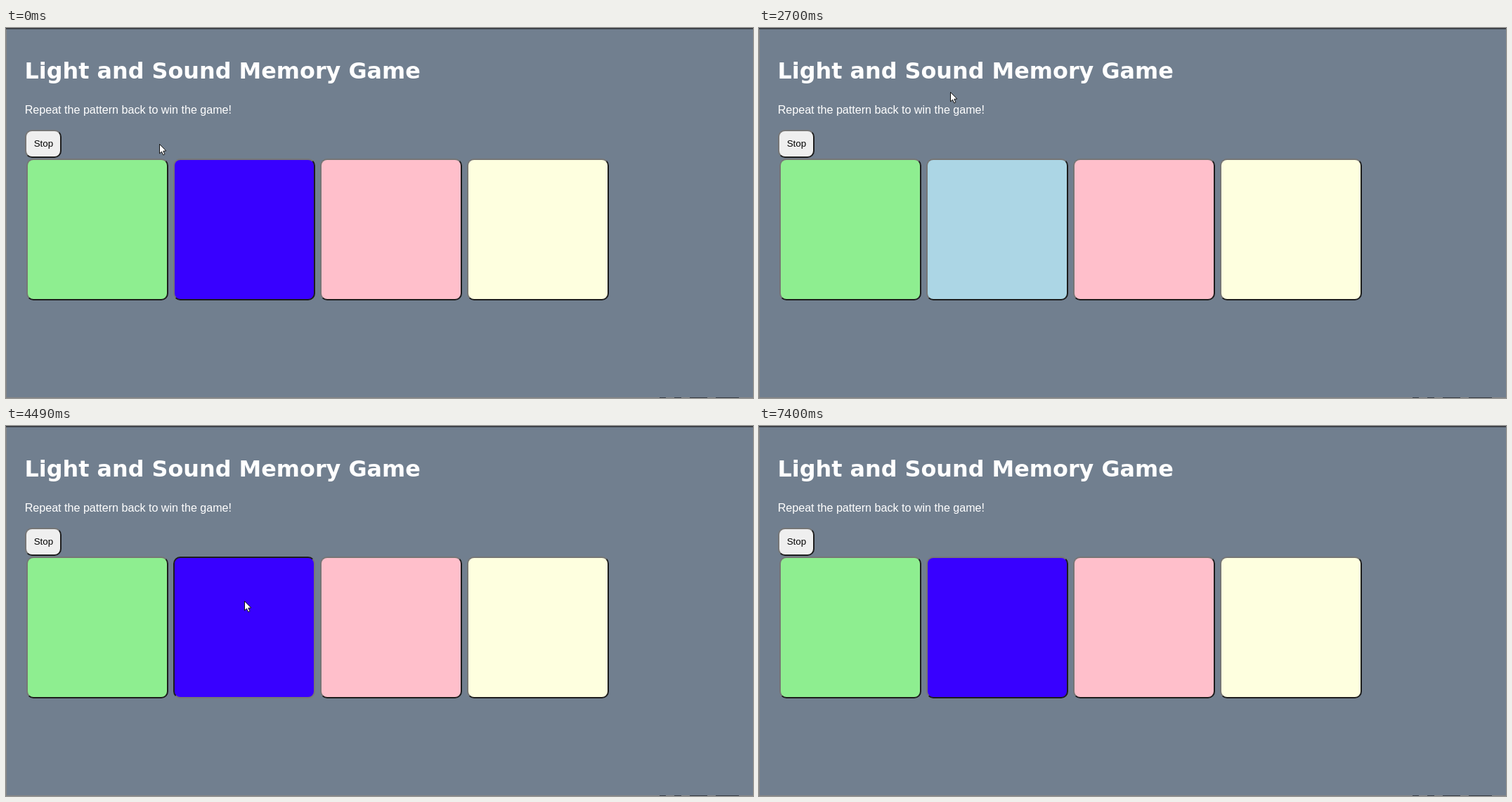
An HTML page with a canvas for the animation above (8 s loop, 1063 px wide and 527 px high).

```html
<!DOCTYPE html>
<html lang="en">
<head>
<meta charset="utf-8">
<title>Memory game</title>
<style>
html, body { margin: 0; width: 100%; height: 100%; overflow: hidden; background: #717f8f; }
canvas { display: block; }
</style>
</head>
<body>
<canvas id="stage" width="1063" height="527"></canvas>
<script>
const ctx = document.getElementById('stage').getContext('2d');
const LOOP = 8000;
const LIGHT = '#767676', DARK = '#1d1d1d';

// Clues glow for HOLD, one per PERIOD, in rounds of two
const HOLD = 1010, PERIOD = 1320, ROUNDS = [-2060, 1680, 6080];

// Two clicks in a row
const CLICK = 4490, CLICK_GAP = 420, CLICK_HOLD = 140;

// The pointer glides in steps of one BEAT, then vanishes over the text
const BEAT = 140, HIDE = 5450;
const HOME = { x: 218, y: 165 };
const GLIDES = [
  { at: 390, steps: 2, x: 335, y: 238 },
  { at: 850, steps: 1, x: 272, y: 91 },
  { at: 2820, steps: 3, x: 340, y: 238 },
  { at: 4340, steps: 2, x: 339, y: 249 },
  { at: 5190, steps: 3, x: 290, y: 94 }
];

// True in the first `hold` ms of each of two repeats
const pulse = (t, period, hold) => t >= 0 && t < 2 * period && t % period < hold;
const isPressed = t => pulse(t - CLICK, CLICK_GAP, CLICK_HOLD);
const isLit = t => isPressed(t) || ROUNDS.some(start => pulse(t - start, PERIOD, HOLD));

function pointerAt(t) {
  let { x, y } = HOME;
  for (const g of GLIDES) {
    if (t < g.at) break;
    const p = Math.min(1, Math.floor((t - g.at) / BEAT + 1) / g.steps);
    x += (g.x - x) * p;
    y += (g.y - y) * p;
  }
  return [Math.round(x), Math.round(y)];
}

function rect(color, x, y, w, h) {
  ctx.fillStyle = color;
  ctx.fillRect(x, y, w, h);
}

function round(color, x, y, w, h, r) {
  ctx.fillStyle = color;
  ctx.beginPath();
  ctx.roundRect(x, y, w, h, r);
  ctx.fill();
}

function polygon(points) {
  ctx.beginPath();
  points.forEach(([x, y]) => ctx.lineTo(x, y));
  ctx.closePath();
}

function text(str, font, color, x, y) {
  ctx.font = font;
  ctx.fillStyle = color;
  ctx.fillText(str, x, y);
}

// Bevelled button: the two border tones meet on the corner diagonals
function button(x, y, w, h, fill, pressed = false) {
  const r = 10, b = 2;
  const half = (color, cx, cy) => {
    ctx.save();
    polygon([[x, y + h], [cx, cy], [x + w, y], [x + w - r, y + r], [x + r, y + h - r]]);
    ctx.clip();
    round(color, x, y, w, h, r);
    ctx.restore();
  };
  round(fill, x + 1, y + 1, w - 2, h - 2, r - 1);
  half(pressed ? DARK : LIGHT, x, y);
  ctx.save();
  polygon([[x, y + h], [x + r, y + h - r], [x + w - r, y + r], [x + w, y], [x + w, y + h]]);
  ctx.clip();
  round(pressed ? LIGHT : DARK, x, y, w, h, r);
  ctx.restore();
  round(fill, x + b, y + b, w - 2 * b, h - 2 * b, r - b);
}

function pointer(x, y) {
  ctx.save();
  ctx.translate(x + 0.5, y + 0.5);
  polygon([[0, 0], [0, 13.3], [3, 10.6], [5.2, 15.3], [7.4, 14.3], [5.3, 9.8], [9.3, 9.5]]);
  ctx.fillStyle = '#fff';
  ctx.fill();
  ctx.strokeStyle = '#111';
  ctx.stroke();
  ctx.restore();
}

function backdrop() {
  rect('#717f8f', 0, 0, 1063, 527);
  rect('#858585', 0, 0, 1, 527);
  rect('#858585', 0, 526, 1063, 1);
  rect('#35383d', 0, 0, 1063, 1);
  rect('#4b525b', 0, 1, 1063, 1);
  let x = 930;
  for (const w of [9, 10, 25, 33]) {
    rect('#3a3e44', x, 526, w, 1);
    x += w + 12;
  }
}

function draw(t) {
  backdrop();
  text('Light and Sound Memory Game', 'bold 31.85px "DejaVu Sans", sans-serif', '#fff', 26.5, 71.5);
  text('Repeat the pattern back to win the game!', '16.1px "Liberation Sans", sans-serif', '#fff', 26.7, 122);

  button(27, 145, 52, 40, '#efefef');
  text('Stop', '13.333px "Liberation Sans", sans-serif', '#000', 39.7, 169);

  const blue = isLit(t) ? '#3800ff' : '#acd6e5';
  ['#8eee90', blue, '#ffbfcb', '#feffdf'].forEach((fill, i) =>
    button(29 + 209 * i, 186, 202, 202, fill, i === 1 && isPressed(t)));

  if (t < HIDE) pointer(...pointerAt(t));
}

const start = performance.now();
function tick() {
  draw((performance.now() - start) % LOOP);
  requestAnimationFrame(tick);
}
tick();
</script>
</body>
</html>
```
